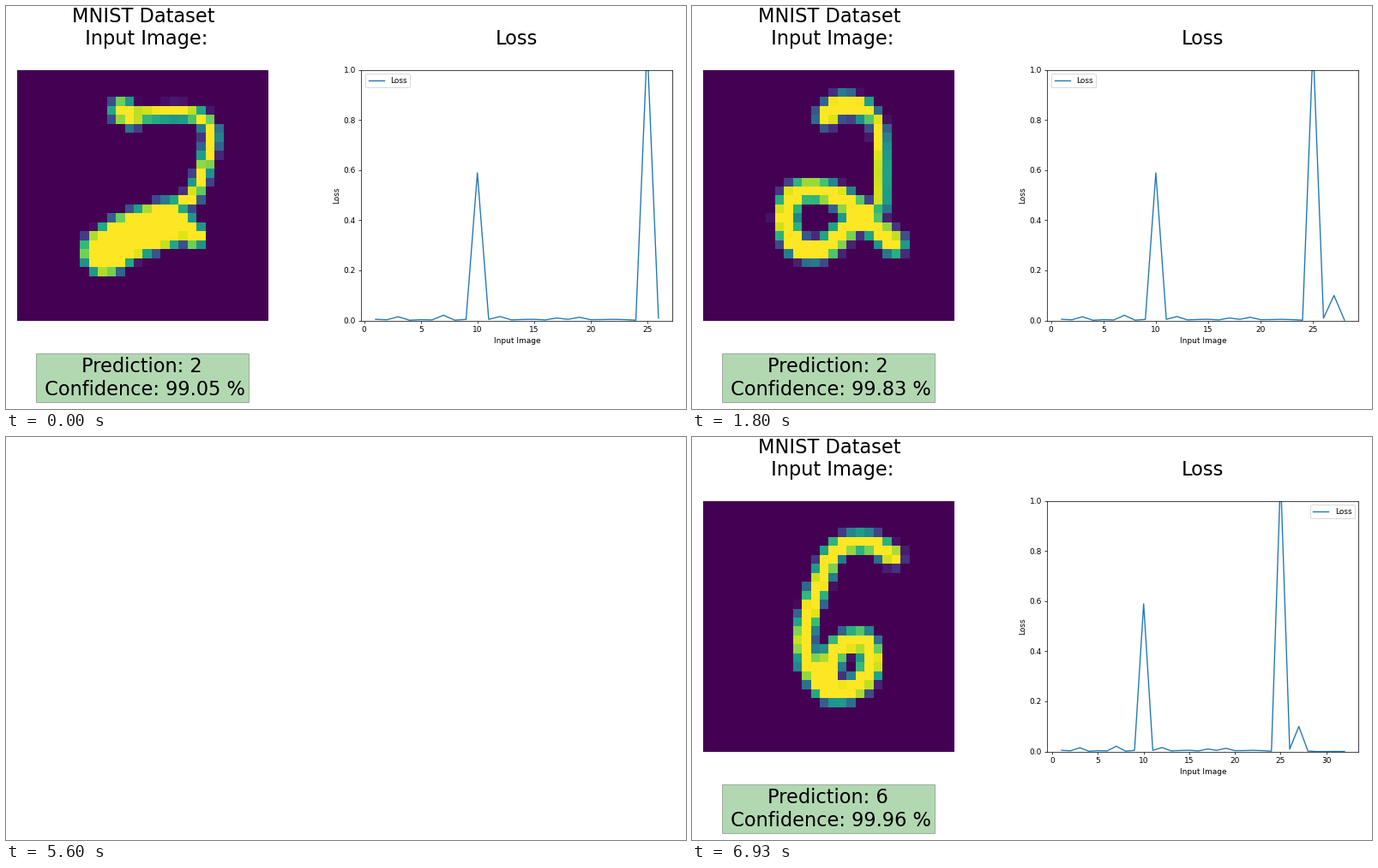
Animation of 793x471 px, one loop 8 s. Source, as a matplotlib script:

```python
import numpy as np
import matplotlib.pyplot as plt
from matplotlib.animation import FuncAnimation

W, H, DPI = 793, 471, 64
LOOP, INTERVAL = 8000, 40
PX = 72 / DPI            # points per pixel
K = 0.9 * PX             # scale of all default sizes

for key in ("font.size", "lines.linewidth", "axes.linewidth", "axes.labelpad", "patch.linewidth",
            "xtick.major.size", "xtick.major.width", "xtick.major.pad",
            "ytick.major.size", "ytick.major.width", "ytick.major.pad"):
    plt.rcParams[key] *= K
plt.rcParams["font.family"] = "DejaVu Sans"

# Small seeded noise with a few peaks, then the images shown in the loop
loss = np.random.default_rng(4).uniform(.001, .005, 32)
for image, value in {3: .015, 7: .021, 10: .589, 12: .016, 17: .01, 19: .013, 25: 1.1}.items():
    loss[image - 1] = value
loss[25:] = .0095, .1, .0017, 0, .0001, .0005, .0004

# Pen strokes: radius, then key points (column, row) of a smooth curve
TWO_FILLED = [
    (1.3, [(11.2, 4), (12.2, 4.6)]),
    (.8, [(13, 4.4), (18.5, 4.3), (20.8, 5.6), (21, 8), (19.3, 13.2), (17.5, 14.5)]),
    (2.6, [(9.3, 19.8), (12.2, 18), (16, 16.7)]),
    (1.3, [(17, 15.8), (19.2, 18)]),
]
TWO_WIDE = [
    (1.2, [(8.5, 8), (12, 5.2), (16.5, 7), (13, 14.5), (6.7, 20.5)]),
    (1.1, [(6.7, 20.5), (20.5, 20)]),
]
TWO_LOOPED = [
    (1.2, [(13.3, 4.6), (15, 3.3), (17.2, 3.8)]),
    (.75, [(17.5, 3.8), (18.9, 5.5), (19.3, 9), (19.3, 14.5)]),
    (1.25, [(17.5, 15.5), (13.5, 13.2), (10, 13.2), (8.7, 16), (10, 19.1),
            (13, 19.4), (17, 16.3), (20.8, 18.9)]),
]
FOUR_SLIM = [
    (.9, [(11.8, 7.6), (9.8, 12.5), (9, 15.8), (12, 16.5), (20.5, 15.2)]),
    (1, [(19.7, 4.6), (17.6, 13.5), (15.9, 19.5), (14.6, 22.5)]),
]
FOUR_BROAD = [
    (1.15, [(11.6, 7.3), (10.4, 11), (8.6, 16.4)]),
    (.95, [(9, 15.9), (22.2, 15.9)]),
    (1.15, [(18.1, 4.7), (15.6, 14), (14.9, 18.5), (15.7, 22.3)]),
]
FIVE = [
    (1, [(18.5, 5.5), (11.5, 5.8)]),
    (1.1, [(11.5, 5.8), (10.8, 11.5), (16, 13), (16, 19), (8.6, 20)]),
]
SIX = [
    (1.1, [(20.6, 5.6), (18.5, 4.3), (16, 4.2), (13.6, 6), (10.8, 14), (11.2, 17.5)]),
    (1.25, [(11.2, 17.5), (13.2, 20.5), (16.3, 20.4), (18.2, 17.8),
            (17.3, 15.1), (14.5, 16), (13.3, 19)]),
]

# start in ms, strokes, predicted digit, number of the input image
STEPS = [
    (0, TWO_FILLED, 2, 26),
    (600, TWO_WIDE, 2, 27),
    (1800, TWO_LOOPED, 2, 28),
    (3070, FOUR_SLIM, 4, 29),
    (4470, FOUR_BROAD, 4, 30),
    (5600, [], None, 0),      # empty stage
    (5670, FIVE, 5, 31),
    (6930, SIX, 6, 32),
]


def smooth(points):
    """Catmull-Rom curve through the points, finely sampled."""
    p = np.array(points, float)
    p = np.vstack([2 * p[0] - p[1], p, 2 * p[-1] - p[-2]])
    t = np.linspace(0, 1, 40)[:, None]
    return np.vstack([
        b + t / 2 * (c - a + t * (2 * a - 5 * b + 4 * c - d + t * (3 * (b - c) + d - a)))
        for a, b, c, d in zip(p, p[1:], p[2:], p[3:])])


def rasterize(strokes):
    """Grey 28 x 28 picture of round pen strokes."""
    y, x = np.mgrid[:28, :28]
    grid = np.zeros((28, 28))
    for radius, points in strokes:
        px, py = smooth(points).T
        dist = np.hypot(x[..., None] - px, y[..., None] - py).min(axis=-1)
        grid = np.maximum(grid, np.clip(radius + .5 - dist, 0, 1))
    return grid


def add_axes(left, top, right, bottom):
    return fig.add_axes([left / W, 1 - bottom / H, (right - left) / W, (bottom - top) / H])


def add_text(x, y, text, **style):
    return fig.text(x / W, 1 - y / H, text, size=25 * K, ha="center", va="baseline", **style)


fig = plt.figure(figsize=(W / DPI, H / DPI), dpi=DPI, facecolor="white")

image_ax = add_axes(13.4, 74.6, 306.4, 367.6)
image_ax.axis("off")
picture = image_ax.imshow(np.zeros((28, 28)), cmap="viridis", vmin=0, vmax=1,
                          aspect="auto", interpolation="nearest")

loss_ax = add_axes(414.4, 74.6, 777.4, 367.6)
curve, = loss_ax.plot([], [], label="Loss")
loss_ax.set(ylim=(0, 1), xlabel="Input Image", ylabel="Loss")
legend = loss_ax.legend(loc="upper left")

add_text(160.1, 45.2, "MNIST Dataset\n Input Image:")
add_text(595.8, 45.2, "Loss")
result = add_text(158.6, 454.6, "", bbox=dict(facecolor="green", alpha=.3, pad=4 * K))

pictures = [rasterize(strokes) for _, strokes, _, _ in STEPS]


def update(frame):
    end = (frame + 1) * INTERVAL - 1
    index = max(i for i, step in enumerate(STEPS) if step[0] <= end)
    _, _, digit, count = STEPS[index]
    for artist in fig.axes + fig.texts:
        artist.set_visible(count > 0)
    if count:
        picture.set_data(pictures[index])
        curve.set_data(range(1, count + 1), loss[:count])
        margin = .05 * (count - 1)
        loss_ax.set_xlim(1 - margin, count + margin)
        legend.set_loc("upper left" if count < 29 else "upper right")
        confidence = round(100 * float(np.exp(-loss[count - 1])), 2)
        result.set_text(f"Prediction: {digit}\n Confidence: {confidence} %")
    return []


anim = FuncAnimation(fig, update, frames=LOOP // INTERVAL, interval=INTERVAL,
                     repeat=True, repeat_delay=0)
plt.show()
```
